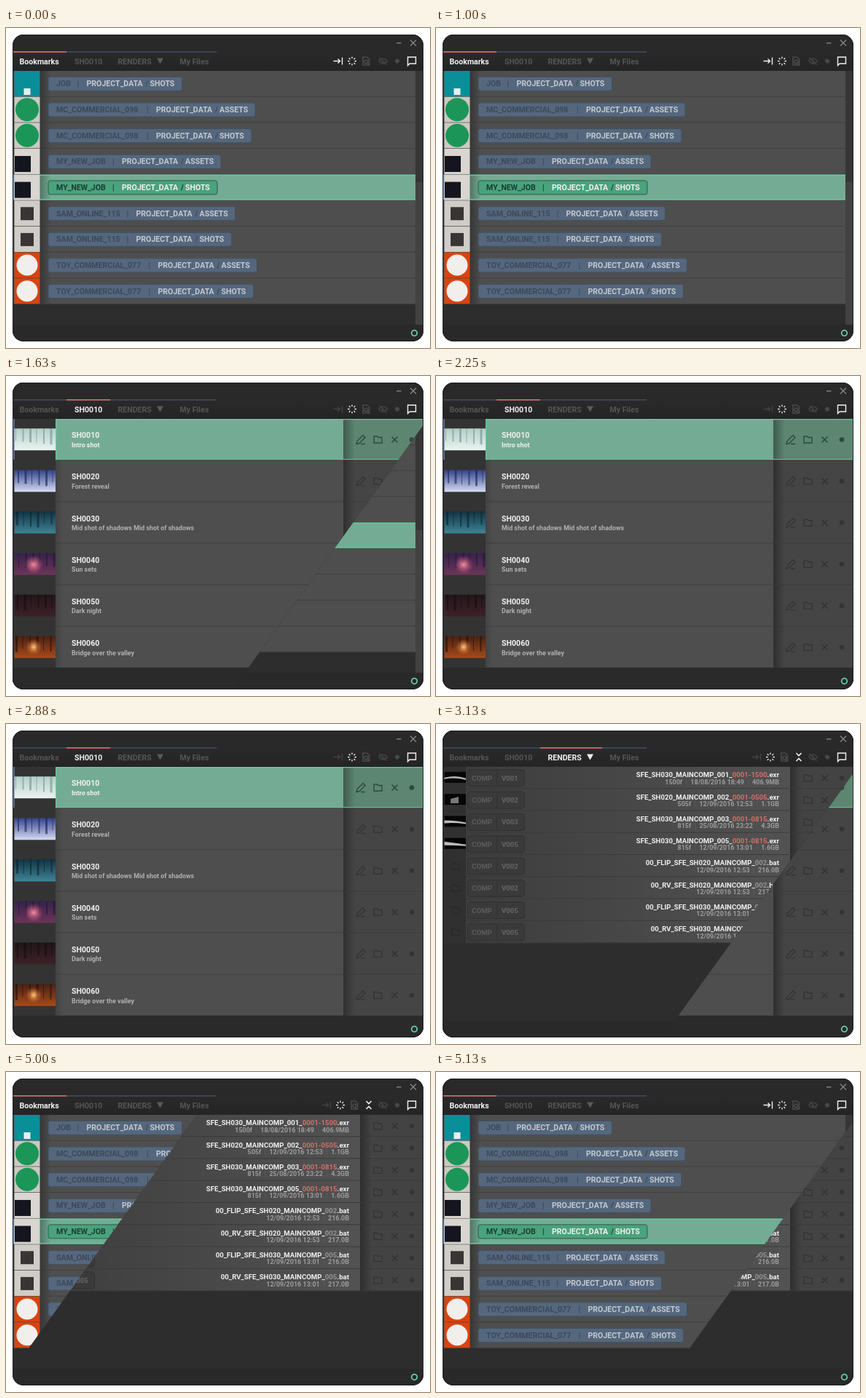
Recreate the animation shown at these times as an HTML page. Size 582x440 px, loop 5.26 s.

```html
<!DOCTYPE html>
<html lang="en">
<head>
<meta charset="utf-8">
<title>Shot browser</title>
<style>
html, body { margin: 0; width: 100%; height: 100%; overflow: hidden; background: #fff; }
svg { display: block; width: 582px; height: 440px; }
text { font: 700 10.6px Roboto, sans-serif; white-space: pre; }
</style>
</head>
<body>
<svg id="stage" viewBox="0 0 582 440"></svg>
<script>
const WHITE = '#f0f0f0', DIM = '#484848', DARK = '#343434', RED = '#dc7272',
      BLUE = '#3f4960', GREEN = '#74ab94', LINE = '#62cfa4', ROW = '#4e4e4e', SEP = '#3a3a3a';

const rect = (x, y, w, h, fill, more = '') =>
  `<rect x="${x}" y="${y}" width="${w}" height="${h}" fill="${fill}" ${more}/>`;
const circle = (x, y, r, fill, more = '') =>
  `<circle cx="${x}" cy="${y}" r="${r}" fill="${fill}" ${more}/>`;
const text = (x, y, s, fill, size = 10.6, more = '') =>
  `<text x="${x}" y="${y}" fill="${fill}" style="font-size:${size}px" ${more}>${s}</text>`;
const span = (s, fill) => `<tspan fill="${fill}">${s}</tspan>`;
const each = (n, draw) => Array.from({ length: n }, (_, i) => draw(i)).join('');

// Icons are drawn around their own centre
const ICONS = {
  arrow: 'M-6 0H3M0-3L3 0L0 3M6-5V5',
  page: 'M-4-5.5H1.5L4.5-2.5V5.5H-4ZM-2 1a2.3 2.3 0 1 0 4.6 0a2.3 2.3 0 1 0-4.6 0M2 3L4 5',
  eye: 'M-6 0Q0-7 6 0Q0 7-6 0M-5-5L5 5M-1.5 0a1.5 1.5 0 1 0 3 0',
  bubble: 'M-5.5-5.5H5.5V3.5H-3L-5.5 6Z',
  fold: 'M-3.5-5.5L0-2L3.5-5.5M-3.5 5.5L0 2L3.5 5.5',
  spinner: 'M0-6V-3.4M0 6V3.4M-6 0H-3.4M6 0H3.4M-4.2-4.2L-2.5-2.5M4.2 4.2L2.5 2.5M-4.2 4.2L-2.5 2.5M4.2-4.2L2.5-2.5',
  pencil: 'M-6 6L-5 2L3-6L6-3L-2 5ZM0 6H6',
  folder: 'M-5.5-4.5H-1L.5-3H5.5V4.5H-5.5Z',
  cross: 'M-4-4L4 4M4-4L-4 4'
};
const icon = (name, x, y, color, width = 1.4) =>
  `<path d="${ICONS[name]}" transform="translate(${x} ${y})" fill="none" stroke="${color}" stroke-width="${width}"/>`;
const status = circle(560.5, 419.5, 3.8, 'none', `stroke="${LINE}" stroke-width="1.8"`);

const TABS = [['Bookmarks', 18.5, 9, 83], ['SH0010', 94, 83, 143], ['RENDERS', 153.5, 143, 228], ['My Files', 238.5, 228, 289]];

function frame(active) {
  const shift = active === 2 ? 16 : 0;
  const tabs = TABS.map(([name, x, from, to], i) =>
    rect(from, 32, to - from, 1.6, i === active ? RED : BLUE) +
    text(x, 49.6, name, i === active ? WHITE : '#555')).join('');
  return rect(9, 9, 564, 422, '#2d2d2d') + rect(9, 9, 564, 23, '#292929') +
    rect(9, 32, 564, 27, 'url(#bar)') + rect(9, 408, 564, 23, '#292929') + tabs +
    `<path d="M207 41.5H216L211.5 49.5Z" fill="${active === 2 ? WHITE : '#5a5a5a'}"/>` +
    rect(536, 20, 6.5, 1.3, '#888') + icon('cross', 559, 20.5, '#888', 1.2) +
    icon('arrow', 455.5 - shift, 45.5, active ? '#424242' : WHITE) +
    icon('spinner', 475 - shift, 45.5, WHITE, 1.3) +
    icon('page', 494 - shift, 45.5, DIM, 1.7) + (shift ? icon('fold', 498, 45.5, WHITE, 1.6) : '') +
    icon('eye', 517.5, 45.5, '#424242') + circle(537, 45.5, 3, DIM) + icon('bubble', 557, 45.5, WHITE) + status;
}

// Bookmarks: [job, x of the path, last folder]
const JOBS = [
  ['JOB', 110.5, 'SHOTS'], ['MC_COMMERCIAL_098', 206, 'ASSETS'], ['MC_COMMERCIAL_098', 206, 'SHOTS'],
  ['MY_NEW_JOB', 159, 'ASSETS'], ['MY_NEW_JOB', 159, 'SHOTS'],
  ['SAM_ONLINE_115', 178.5, 'ASSETS'], ['SAM_ONLINE_115', 178.5, 'SHOTS'],
  ['TOY_COMMERCIAL_077', 208.5, 'ASSETS'], ['TOY_COMMERCIAL_077', 208.5, 'SHOTS']
];

function badge(i, y) {
  const kind = (i + 1) >> 1;
  const tile = ['#0a8f99', '#cbc9c2', '#d9d5d0', '#d0cdc8', '#d8440f'][kind];
  const mark = [
    rect(24.5, y + 24, 9, 9, '#e8eeee'), circle(29, y + 17.5, 16, '#1c9658'),
    rect(12, y + 10, 22, 22, '#15151f'), rect(20, y + 9, 18, 18, '#3a3535'),
    circle(29, y + 17.5, 14.5, '#f1efec')][kind];
  return rect(11.5, y, 35, 35, tile) + mark;
}

function bookmarks() {
  const rows = JOBS.map(([job, x, last], i) => {
    const y = 59 + 35.65 * i, on = i === 4, base = y + 21.3;
    const end = x + (last === 'SHOTS' ? 131 : 136);
    const low = on ? '#1c3d33' : '#3c495b', high = on ? WHITE : '#c3c9d0';
    return rect(9, y, 553, 35.65, on ? GREEN : ROW) + rect(9, y + 34.9, 553, 1, SEP) +
      rect(46, y, 16, 35, 'url(#shade)') +
      (on ? rect(46, y, 516, 1.3, LINE) + rect(46, y + 33.6, 516, 1.3, LINE) : '') +
      rect(9, y, 2.5, 35, on ? '#7d9cc4' : '#484848') + badge(i, y) +
      rect(58, y + 8.3, end - 58, 19, on ? '#49a37d' : '#55677d',
        `rx="3" stroke="${on ? '#2f5a48' : '#435160'}"`) +
      text(69, base, job, low) + text(x - 13, base, '|', low) +
      text(x, base, 'PROJECT_DATA', high) + text(x + 81, base, '/', low) + text(x + 87, base, last, high);
  }).join('');
  return frame(0) + rows + rect(562, 59, 11, 349, '#363636') + rect(562, 212, 11, 196, '#424242', 'rx="2"');
}

// Shots: [description, far tone, near tone, trunk]
const SHOTS = [
  ['Intro shot', '#b4cfca', '#eaf3ef', '#74928f'],
  ['Forest reveal', '#34438c', '#d5dbf3', '#1c2450'],
  ['Mid shot of shadows Mid shot of shadows', '#123444', '#3f8496', '#0b2230'],
  ['Sun sets', '#35234a', '#6c3458', '#241733'],
  ['Dark night', '#21161a', '#3e2027', '#140d10'],
  ['Bridge over the valley', '#4a2114', '#a64a1a', '#21100b']
];

function photo(i, y) {
  const trees = each(6, k =>
    rect(13 + k * 9.5 + (k * 5 + i * 3) % 5, y, 1 + (k + i) % 3, 17 + (k * 7 + i) % 6, SHOTS[i][3], 'opacity=".6"'));
  const light = i === 3 ? circle(38, y + 16, 13, 'url(#pink)') : i === 5 ? circle(38, y + 15, 11, 'url(#sun)') : '';
  return rect(11.5, y, 56.5, 30, `url(#photo${i})`) + trees + light;
}

function shots() {
  const rows = SHOTS.map(([note], i) => {
    const y = 59 + 57.1 * i, on = !i, ink = on ? '#2b4a3d' : DARK, mid = y + 28.5;
    return rect(9, y, 59, 57.1, '#333') + rect(68, y, 395, 57.1, on ? GREEN : ROW) +
      rect(463, y, 110, 57.1, on ? '#5c8671' : '#454545') + rect(463, y, 16, 57.1, 'url(#shade)') +
      (on ? rect(68.6, y + .6, 503.8, 55.2, 'none', `stroke="${LINE}" stroke-width="1.2"`) +
            rect(9, y, 2.5, 56, '#6d87b0')
          : rect(68, y, 10, 57.1, 'url(#shade)', 'opacity=".45"')) +
      rect(68, y + 56.3, 505, 1, SEP) + photo(i, y + 13.2) +
      text(90, y + 26.3, `SH00${i + 1}0`, WHITE) +
      text(90, y + 39, note, on ? WHITE : '#b0b0b0', 8.9) +
      icon('pencil', 487, mid, ink) + icon('folder', 510.5, mid, ink) +
      icon('cross', 533.5, mid, ink, 1.7) + circle(557, mid, 3.3, ink);
  }).join('');
  return frame(1) + rows + rect(9, 401, 564, 30, '#2a2a2a') + status;
}

// Renders: [name, greyed or red part, ending, version, details]
const FILES = [
  ['SFE_SH030_MAINCOMP_001_', '0001-1500', '.exr', 1, '1500f|18/08/2016 18:49|406.9MB'],
  ['SFE_SH020_MAINCOMP_002_', '0001-0505', '.exr', 2, '505f|12/09/2016 12:53|1.1GB'],
  ['SFE_SH030_MAINCOMP_003_', '0001-0815', '.exr', 3, '815f|25/08/2016 23:22|4.3GB'],
  ['SFE_SH030_MAINCOMP_005_', '0001-0815', '.exr', 5, '815f|12/09/2016 13:01|1.6GB'],
  ['00_FLIP_SFE_SH020_MAINCOMP_', '002', '.bat', 2, '12/09/2016 12:53|216.0B'],
  ['00_RV_SFE_SH020_MAINCOMP_', '002', '.bat', 2, '12/09/2016 12:53|217.0B'],
  ['00_FLIP_SFE_SH030_MAINCOMP_', '005', '.bat', 5, '12/09/2016 13:01|216.0B'],
  ['00_RV_SFE_SH030_MAINCOMP_', '005', '.bat', 5, '12/09/2016 13:01|217.0B']
];

function still(i, y) {
  const top = y + 7;
  const light = i === 1 ? `<path d="M20 ${top + 13}V${top + 7}L31 ${top + 4}V${top + 13}Z" fill="#777"/>`
    : `<path d="M11.5 ${top + 8 - i}Q28 ${top + 4 + i} 41 ${top + 9}V${top + 11}Q25 ${top + 7 + i} 11.5 ${top + 10}Z" fill="#bbb"/>`;
  return rect(11.5, top, 29.5, 15, '#060606') + light;
}

function renders() {
  const rows = FILES.map(([name, part, ending, version, info], i) => {
    const y = 58.8 + 30.3 * i, mid = y + 15.5, image = i < 4;
    const bar = span('\u00a0\u00a0|\u00a0\u00a0', '#5c5c5c');
    return rect(9, y, 32, 30.3, '#303030') + rect(41, y, 445, 30.3, '#525252') +
      rect(41, y, 445, 30.3, 'url(#fade)') + rect(486, y, 87, 30.3, '#434343') +
      rect(486, y, 16, 30.3, 'url(#shade)') + rect(41, y + 29.3, 532, 1, SEP) +
      (image ? still(i, y) : icon('folder', 27, mid, '#292929')) +
      rect(43.5, y + 4, 78, 23, '#3a3a3a', 'rx="4" stroke="#303030"') + rect(83, y + 5, 1, 21, '#323232') +
      text(49, y + 19, 'COMP', '#5c5c5c', 9.8) + text(90, y + 19, 'V00' + version, '#666', 9.6) +
      text(471, y + 14.4, name + span(part, image ? '#d66c69' : '#959595') + ending, WHITE, 9.63, 'text-anchor="end"') +
      text(471, y + 23.7, info.split('|').join(bar), '#9c9c9c', 9, 'text-anchor="end"') +
      icon('folder', 510.5, mid, DARK) + icon('cross', 533.5, mid, DARK, 1.7) + circle(557, mid, 3.3, DARK);
  }).join('');
  return frame(2) + rows;
}

const gradient = (id, from, to, vertical) =>
  `<linearGradient id="${id}" ${vertical ? 'x2="0" y2="1"' : ''}><stop stop-color="${from}"/><stop offset="1" stop-color="${to}"/></linearGradient>`;
const glow = (id, a, b) =>
  `<radialGradient id="${id}"><stop stop-color="${a}"/><stop offset="1" stop-color="${b}" stop-opacity="0"/></radialGradient>`;

const stage = document.getElementById('stage');
stage.innerHTML = `<defs>
  ${gradient('bar', '#2a2a2a', '#242424', true)}
  ${gradient('shade', 'rgba(0,0,0,.32)', 'rgba(0,0,0,0)')}
  ${gradient('fade', 'rgba(0,0,0,.26)', 'rgba(0,0,0,0)')}
  ${SHOTS.map(([, far, near], i) => gradient('photo' + i, far, near, true)).join('')}
  ${glow('pink', '#f590a0', '#c8487a')}${glow('sun', '#ffc880', '#e06a20')}
  <clipPath id="window"><rect x="9" y="9" width="564" height="422" rx="15"/></clipPath>
  <clipPath id="wipe"><polygon id="edge"/></clipPath></defs>
  <g id="scenes" clip-path="url(#window)">${[bookmarks, shots, renders].map(draw => `<g>${draw()}</g>`).join('')}</g>
  ${rect(9.5, 9.5, 563, 421, 'none', 'rx="14.5" stroke="#1e1e1e"')}`;

const holder = document.getElementById('scenes'), scenes = [...holder.children];
const edge = document.getElementById('edge');
const LOOP = 5260, SLOPE = .72, STARTS = [1500, 3000, 5000];
let shown = '';

// A diagonal wipe uncovers the next scene in two held steps
function render(t) {
  const n = STARTS.filter(s => t >= s).length;
  const age = n ? t - STARTS[n - 1] : LOOP;
  const step = age < 130 ? 0 : age < 250 ? 1 : 2;
  const key = n + ':' + step;
  if (key === shown) return;
  shown = key;
  const now = n % 3, before = (n + 2) % 3;
  scenes.forEach((g, i) => {
    g.style.display = i === now || (i === before && step < 2) ? '' : 'none';
    g.removeAttribute('clip-path');
  });
  holder.append(scenes[now]);
  if (step < 2) {
    const x = 304.5 + 317 * step;
    edge.setAttribute('points', `-20,0 ${x},0 ${x - 440 * SLOPE},440 -20,440`);
    scenes[now].setAttribute('clip-path', 'url(#wipe)');
  }
}

const begin = performance.now();
function tick() {
  render((performance.now() - begin) % LOOP);
  requestAnimationFrame(tick);
}
tick();
</script>
</body>
</html>
```
